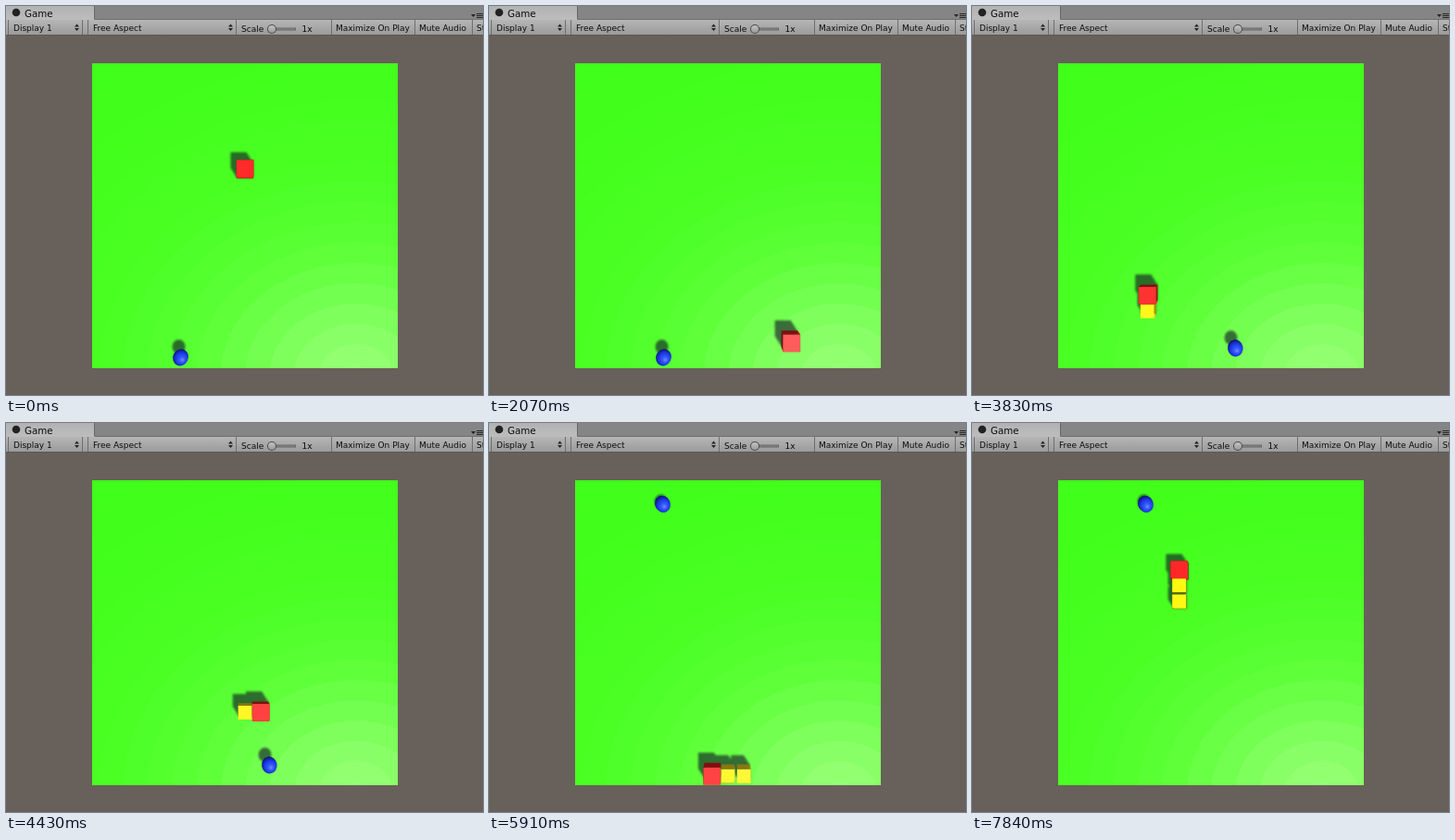
An HTML page with a canvas for the animation above (7.99 s loop, 515 by 421 pixels).

```html
<!DOCTYPE html>
<html lang="en">
<head>
<meta charset="utf-8">
<title>Snake</title>
<style>
html, body { margin: 0; width: 100%; height: 100%; overflow: hidden; background: #68605a; }
canvas { display: block; }
</style>
</head>
<body>
<canvas id="stage" width="515" height="421"></canvas>
<script>
const ctx = document.getElementById('stage').getContext('2d');
const LOOP = 7990, TICK = 147.8, LAST = 53;
const CX = 258, CY = 227.4;            // camera axis
const TOP = 17.2, BASE = 16.55;        // cell size at cube top and on the ground
const START = [0, -3];
const MOVES = [[1, 0, 4], [0, 1, 12], [-1, 0, 8], [0, -1, 4], [1, 0, 7], [0, 1, 4], [-1, 0, 5], [0, -1, 13]];
const MEALS = [24, 40];                // cells travelled when food is eaten
const FOOD = [[188.5, 380.3], [284.3, 370.3], [187.5, 87.8]];
const RED = { size: 18.6, top: '#80100f', left: '#701010', right: '#a01414', bottom: '#e62020' };
const YELLOW = { size: 14.8, top: '#87780f', left: '#6d6010', right: '#a89a10', bottom: '#55650f' };

function rect(x, y, w, h, color) {
  ctx.fillStyle = color;
  ctx.fillRect(x, y, w, h);
}

function poly(points, color) {
  ctx.beginPath();
  points.forEach(([x, y]) => ctx.lineTo(x, y));
  ctx.closePath();
  ctx.fillStyle = color;
  ctx.fill();
}

function disc(x, y, r, color) {
  ctx.beginPath();
  ctx.arc(x, y, r, 0, Math.PI * 2);
  ctx.fillStyle = color;
  ctx.fill();
}

function label(text, x, y, size = 9) {
  ctx.font = size + 'px "DejaVu Sans", sans-serif';
  ctx.fillStyle = '#0c0c0c';
  ctx.fillText(text, x, y);
}

function shade(y0, y1, c0, c1) {
  const g = ctx.createLinearGradient(0, y0, 0, y1);
  g.addColorStop(0, c0);
  g.addColorStop(1, c1);
  return g;
}

// Strength of the light's reflection at distance r from its centre.
const glow = r => Math.pow(1 + (r / 130) ** 2, -1.3);
const glowAt = (x, y) => glow(Math.hypot((x - 378) / 1.2, y - 400));

function drawGround() {
  rect(0, 31, 515, 390, '#68605a');
  ctx.save();
  ctx.beginPath();
  ctx.rect(93, 62, 330, 330);
  ctx.clip();
  for (let r = 430; r > 0; r -= 22) {
    const f = glow(r - 11);
    ctx.beginPath();
    ctx.ellipse(378, 400, r * 1.2, r, 0, 0, Math.PI * 2);
    ctx.fillStyle = `rgb(${60 + 89 * f}, 255, ${21 + 95 * f})`;
    ctx.fill();
  }
  ctx.restore();
}

function drawBar() {
  rect(0, 0, 515, 15, '#858585');
  rect(0, 0, 95, 15, shade(0, 15, '#b2b2b2', '#bdbdbd'));
  rect(95, 0, 1, 14, '#666');
  rect(96, 14, 419, 1, '#707070');
  rect(0, 15, 515, 16, shade(15, 31, '#b6b6b6', '#9b9b9b'));
  rect(0, 31, 515, 1, '#5d5955');
  for (const x of [2, 82, 88, 248, 351, 441, 503]) rect(x, 15, 1, 16, '#6e6e6e');

  disc(11, 7, 4.3, '#222');
  label('Game', 20, 12, 10.3);
  label('Display 1', 8, 27);
  label('Free Aspect', 94, 27);
  label('Scale', 254, 28);
  label('1x', 319.5, 28);
  label('Maximize On Play', 356, 27);
  label('Mute Audio', 446, 27);
  label('St', 508, 27);

  for (const x of [76.5, 242.5]) {
    poly([[x - 2.5, 22.5], [x, 19.5], [x + 2.5, 22.5]], '#222');
    poly([[x - 2.5, 24], [x, 27], [x + 2.5, 24]], '#222');
  }
  rect(290, 23.5, 23, 3, '#666');
  rect(290, 24.5, 22, 1, '#8c8c8c');
  disc(287, 25, 5, '#4a4a4a');
  disc(287, 25, 4, shade(21, 29, '#c4c4c4', '#999'));
  poly([[502, 9], [507, 9], [504.5, 12]], '#222');
  for (const y of [8, 10, 12]) rect(508, y, 7, 1, '#222');
}

function cellAt(n) {
  let [u, v] = START;
  for (const [du, dv, len] of MOVES) {
    const k = Math.min(n, len);
    u += du * k;
    v += dv * k;
    n -= k;
  }
  return [u, v];
}

function corners(u, v, cell, half) {
  const x = CX + u * cell, y = CY + v * cell;
  return [[x - half, y - half], [x + half, y - half], [x + half, y + half], [x - half, y + half]];
}

function traceCubeShadow({ u, v, kind }) {
  const b = corners(u, v, BASE, kind.size * 0.46);
  const scale = kind === RED ? 1 : 0.92;
  const a = b.map(([x, y]) => [x - 7 * scale, y - 11 * scale]);
  [a[0], a[1], b[1], b[2], b[3], a[3]].forEach(([x, y], i) => i ? ctx.lineTo(x, y) : ctx.moveTo(x, y));
  ctx.closePath();
}

function drawShadows(cubes, [fx, fy]) {
  ctx.save();
  ctx.filter = 'blur(1.3px)';
  ctx.beginPath();
  cubes.forEach(traceCubeShadow);
  const x = fx - 4 - (fx - CX) * 0.03, y = fy - 7 - (fy - CY) * 0.03;
  ctx.moveTo(x + 7, y);
  ctx.ellipse(x, y, 7, 7.8, 0, 0, Math.PI * 2);
  ctx.fillStyle = 'rgba(15, 20, 40, 0.62)';
  ctx.fill();
  ctx.restore();
}

function drawSides({ u, v, kind, end }) {
  const f = corners(u, v, TOP, kind.size / 2);
  const b = corners(u, v, BASE, kind.size * 0.465);
  const bottom = end && kind === YELLOW ? '#e8e010' : kind.bottom;
  [kind.top, kind.right, bottom, kind.left].forEach((color, i) => {
    const j = (i + 1) % 4;
    poly([f[i], f[j], b[j], b[i]], color);
  });
}

function drawFront({ u, v, kind }) {
  const f = glowAt(CX + u * TOP, CY + v * TOP);
  const red = 32 + 74 * f;
  const color = kind === RED ? `rgb(255, ${red}, ${red})` : `rgb(255, 248, ${8 + 76 * f})`;
  poly(corners(u, v, TOP, kind.size / 2), color);
}

function drawBall([x, y]) {
  const g = ctx.createRadialGradient(x + 2, y + 3, 0, x + 1, y + 1, 10);
  g.addColorStop(0, '#6c8cff');
  g.addColorStop(0.3, '#3458fa');
  g.addColorStop(0.65, '#1c38e6');
  g.addColorStop(1, '#0a1478');
  ctx.beginPath();
  ctx.ellipse(x, y, 9.2, 8.3, Math.atan2(y - CY, x - CX), 0, Math.PI * 2);
  ctx.fillStyle = g;
  ctx.fill();
}

function draw(t) {
  const tick = Math.min(LAST, Math.floor((t + 16) / TICK));
  // The snake moves a little faster than the screen refreshes, so some ticks skip a cell.
  const n = tick + Math.floor((tick + 7.5) / 12.5);
  const eaten = MEALS.filter(m => n >= m).length;
  const tail = MEALS.filter(m => n > m).length;
  const cubes = [];
  for (let i = tail; i >= 0; i--) {
    const [u, v] = cellAt(n - i);
    cubes.push({ u, v, kind: i ? YELLOW : RED, end: i === tail });
  }
  drawGround();
  drawBar();
  drawShadows(cubes, FOOD[eaten]);
  drawBall(FOOD[eaten]);
  cubes.forEach(drawSides);
  cubes.forEach(drawFront);
}

function loop() {
  draw(performance.now() % LOOP);
  requestAnimationFrame(loop);
}
loop();
</script>
</body>
</html>
```
